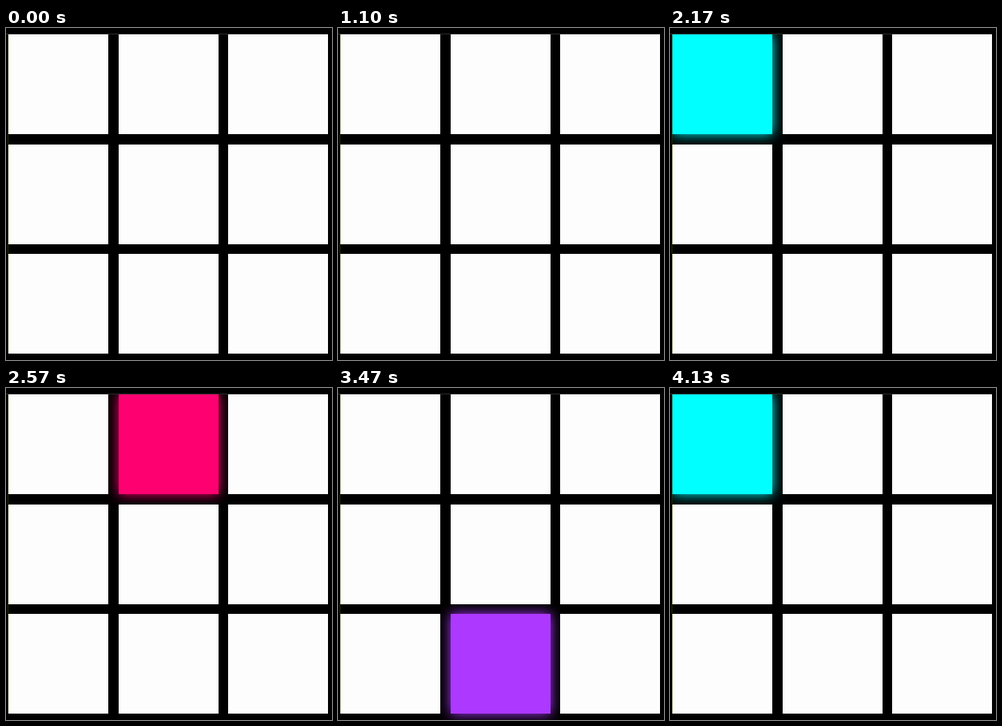
Animation, 408 px wide and 416 px high, one loop 4160 ms. Source, as an HTML page with a canvas:

```html
<!DOCTYPE html>
<html lang="en">
<head>
<meta charset="utf-8">
<title>Hover grid</title>
<style>
  html, body { margin: 0; width: 100%; height: 100%; overflow: hidden; background: #000; }
  canvas { display: block; }
</style>
</head>
<body>
<canvas width="408" height="416"></canvas>
<script>
const ctx = document.querySelector('canvas').getContext('2d');
const LOOP = 4160, SIZE = 125, PITCH = 137.5, LEFT = 3, TOP = 8;
const COLORS = ['#00ffff', '#ff0070', '#ad38ff'];

// Turning points of an unseen pointer: time, x, y.
const path = [
  [0, 536, 345], [1010, 97, 310], [1220, 97, 234], [1565, 225, 190],
  [1600, 290, 165], [1800, 383, 118], [2290, 16, 60], [2710, 330, 81],
  [3250, 62, 349], [3760, 362, 367], [LOOP, 74, 79]
];

const cells = [];
for (let row = 0; row < 3; row++) {
  for (let col = 0; col < 3; col++) {
    cells.push({
      x: Math.round(LEFT + col * PITCH),
      y: Math.round(TOP + row * PITCH),
      color: COLORS[(col - row + 3) % 3]
    });
  }
}

function pointerAt(t) {
  const i = path.findIndex(([time]) => time > t);
  const [t0, x0, y0] = path[i - 1], [t1, x1, y1] = path[i];
  const k = (t - t0) / (t1 - t0);
  return [x0 + (x1 - x0) * k, y0 + (y1 - y0) * k];
}

function rect(color, x, y, w = SIZE, h = SIZE) {
  ctx.fillStyle = color;
  ctx.fillRect(x, y, w, h);
}

function draw(t) {
  const [px, py] = pointerAt(t);
  const inside = (p, start) => p >= start && p < start + SIZE;
  const lit = cells.find(({ x, y }) => inside(px, x) && inside(py, y));

  rect('#000', 0, 0, 408, 416);
  if (lit) {
    ctx.shadowBlur = 15;
    ctx.shadowColor = lit.color;
    rect(lit.color, lit.x, lit.y);
    ctx.shadowBlur = 0;
    ctx.shadowColor = 'transparent';
  }

  // The outer top and left edges hide the glow.
  rect('#000', 0, 0, 408, TOP);
  rect('#000', 0, 0, LEFT, 416);
  rect('#2a2a2a', 0, TOP - 1, 403, 1);
  rect('#2a2a00', LEFT - 1, TOP, 1, 400);

  for (const cell of cells) rect(cell === lit ? cell.color : '#fdfdfd', cell.x, cell.y);
}

function tick() {
  draw(performance.now() % LOOP);
  requestAnimationFrame(tick);
}
tick();
</script>
</body>
</html>
```
